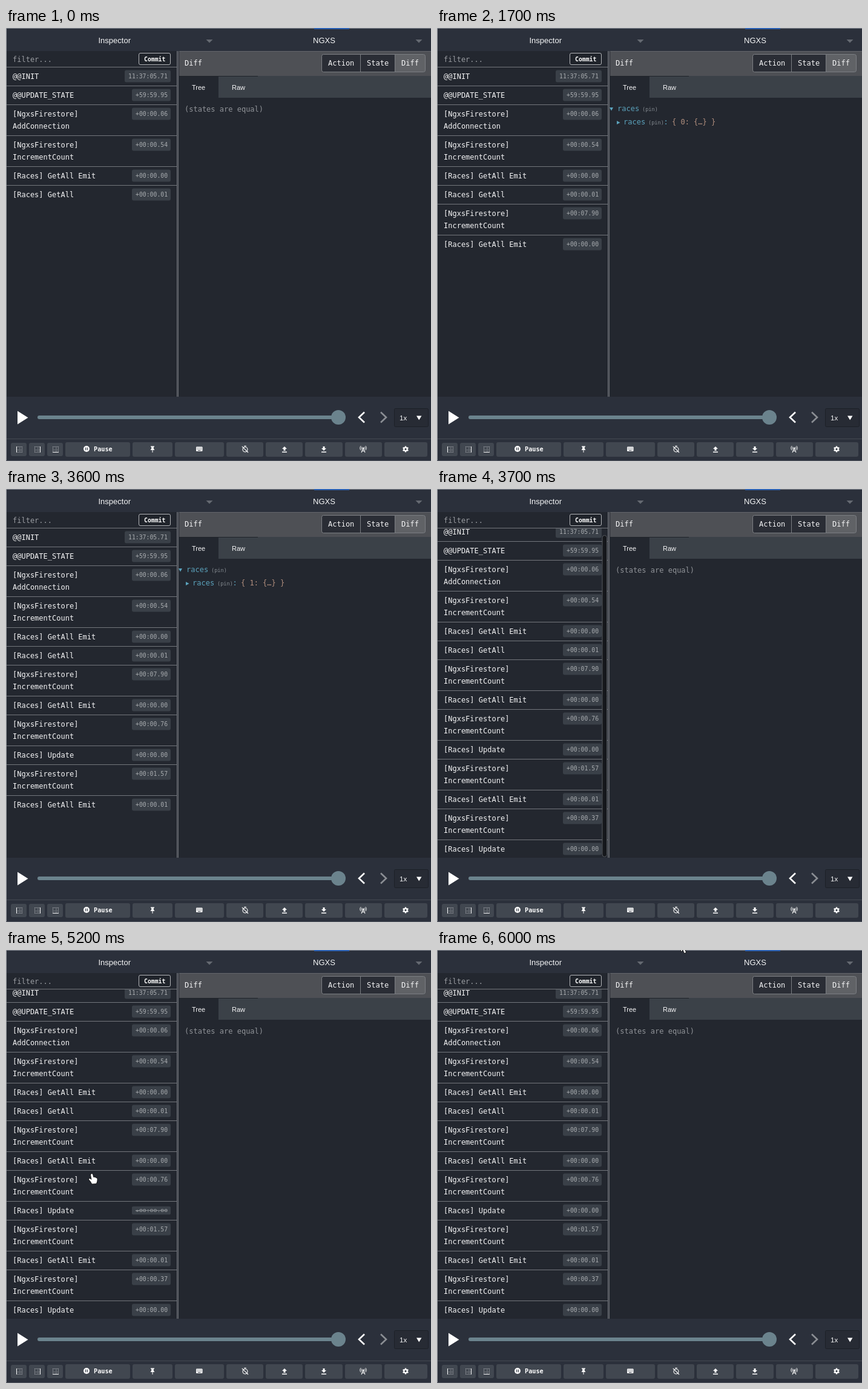
These frames come from a looping animation (702x714 px, 6100 ms). An HTML page with a canvas:

```html
<!DOCTYPE html>
<html lang="en">
<head>
<meta charset="utf-8">
<title>State inspector</title>
<style>
html, body { margin: 0; width: 100%; height: 100%; overflow: hidden; background: #2b303b; }
canvas { display: block; width: 702px; height: 714px; }
</style>
</head>
<body>
<canvas id="stage" width="702" height="714"></canvas>
<script>
const ctx = document.getElementById('stage').getContext('2d');
const LOOP = 6100, STEP = 100;
const MONO = '"DejaVu Sans Mono", monospace';
const SANS = '"Liberation Sans", Arial, sans-serif';
const PANEL = '#2b303b', DARK = '#23272f', LINE = '#73767c', BUTTON = '#414750';
const LIST_TOP = 65, LIST_BOTTOM = 608;
const COUNT = '[NgxsFirestore] IncrementCount', EMIT = '[Races] GetAll Emit', UPDATE = '[Races] Update';

// Each action: time of arrival, label, timestamp
const ACTIONS = [
  [0, '@@INIT', '11:37:05.71'],
  [0, '@@UPDATE_STATE', '+59:59.95'],
  [0, '[NgxsFirestore] AddConnection', '+00:00.06'],
  [0, COUNT, '+00:00.54'],
  [0, EMIT, '+00:00.00'],
  [0, '[Races] GetAll', '+00:00.01'],
  [1100, COUNT, '+00:07.90'],
  [1100, EMIT, '+00:00.00'],
  [1900, COUNT, '+00:00.76'],
  [1900, UPDATE, '+00:00.00'],
  [3400, COUNT, '+00:01.57'],
  [3400, EMIT, '+00:00.01'],
  [3700, COUNT, '+00:00.37'],
  [3700, UPDATE, '+00:00.00']
];
const FLIPPED_ROW = 9;

// Pointer path: time, x, y
const POINTER = [
  [4900, 150, 500], [5000, 142, 438], [5100, 140, 416], [5200, 142, 370], [5300, 168, 285],
  [5500, 268, 150], [5700, 360, 78], [5850, 414, 36], [6000, 403, -12]
];

function rect(x, y, w, h, fill) {
  ctx.fillStyle = fill;
  ctx.fillRect(x, y, w, h);
}

function box(x, y, w, h, r, fill, stroke) {
  ctx.beginPath();
  ctx.roundRect(x, y, w, h, r);
  if (fill) { ctx.fillStyle = fill; ctx.fill(); }
  if (stroke) { ctx.strokeStyle = stroke; ctx.lineWidth = 1; ctx.stroke(); }
}

function text(str, x, y, size, color, family = MONO, weight = 'normal') {
  ctx.font = `${weight} ${size}px ${family}`;
  ctx.fillStyle = color;
  ctx.fillText(str, x, y);
}

function trace(points, close) {
  ctx.beginPath();
  points.forEach(([x, y]) => ctx.lineTo(x, y));
  if (close) ctx.closePath();
}

function poly(fill, ...points) {
  trace(points, true);
  ctx.fillStyle = fill;
  ctx.fill();
}

function stroke(color, width, ...points) {
  trace(points);
  ctx.strokeStyle = color;
  ctx.lineWidth = width;
  ctx.stroke();
}

function disc(x, y, r, fill) {
  ctx.beginPath();
  ctx.arc(x, y, r, 0, 7);
  ctx.fillStyle = fill;
  ctx.fill();
}

function arc(x, y, r, from, to, width) {
  ctx.beginPath();
  ctx.arc(x, y, r, from, to);
  ctx.strokeStyle = '#fff';
  ctx.lineWidth = width;
  ctx.stroke();
}

function drawHeader() {
  rect(0, 0, 702, 714, PANEL);
  text('Inspector', 152.5, 25, 13, '#f4f5f6', SANS);
  text('NGXS', 507, 25, 13, '#f4f5f6', SANS);
  for (const x of [336, 682]) poly('#656971', [x - 5.5, 19], [x + 5.5, 19], [x, 24.5]);
}

function drawPill(label, y, squash) {
  const w = label.length > 9 ? 76 : 64;
  ctx.save();
  ctx.translate(0, y + 14.5);
  ctx.scale(1, squash);
  box(272 - w, -10, w, 20, 3, '#3a4048');
  text(label, 278 - w, 3.6, 9.8, '#a8abaf');
  ctx.restore();
  if (squash < 1) rect(214, y + 14, 52, 1, '#85898e');
}

function drawList(t) {
  rect(1, 38, 282, 570, DARK);
  const rows = ACTIONS.filter(a => a[0] <= t);
  const scroll = rows.length === ACTIONS.length ? 9 : 0;
  ctx.save();
  ctx.beginPath();
  ctx.rect(1, LIST_TOP, 281, LIST_BOTTOM - LIST_TOP);
  ctx.clip();
  let y = LIST_TOP - scroll;
  rows.forEach(([, label, stamp], i) => {
    const lines = label.startsWith('[Ngxs') ? label.split(' ') : [label];
    lines.forEach((line, n) => text(line, 11, y + 19 + n * 20, 12, '#f5f5f6'));
    const flip = i === FLIPPED_ROW ? { 5100: 0.3, 5200: 0.67 }[t] : 1;
    drawPill(stamp, y, flip || 1);
    y += lines.length > 1 ? 51 : 31;
    if (i < rows.length - 1) rect(1, y - 1, 281, 1, LINE);
  });
  ctx.restore();

  rect(1, 64, 281, 1, LINE);
  text('filter...', 11, 55.5, 12, '#9a9da2');
  box(219.5, 41.5, 52, 19, 2.5, '#20242b', '#b4b6ba');
  text('Commit', 228, 55, 9.8, '#fff', MONO, 'bold');

  if (t >= 3700 && t < 4400) {
    ctx.globalAlpha = t < 4300 ? 1 : 0.5;
    box(273, 76.5, 7.5, 530, 4, '#15171b', '#565a60');
    ctx.globalAlpha = 1;
  }
  rect(282, 38, 1, 570, LINE);
  rect(283, 38, 1, 570, '#30343c');
  rect(284, 38, 1, 570, LINE);
}

function drawTree(index) {
  const blue = '#5ba3bd', tan = '#b28f7e', dim = '#858b91';
  poly(blue, [285, 131], [291, 131], [288, 136.5]);
  text('races', 298, 137, 12, blue);
  text('(pin)', 339, 137, 8.6, dim);
  poly(blue, [297, 153], [302.5, 156], [297, 159]);
  text('races', 308, 159, 12, blue);
  text('(pin)', 349, 159, 8.6, dim);
  text(':', 374.5, 159, 12, blue);
  text(`{ ${index}: {…} }`, 388, 159, 12, tan);
}

function drawInspector(t) {
  rect(285, 38, 417, 570, DARK);
  rect(286, 38, 416, 41, '#4e5055');
  rect(286, 38, 416, 1, '#63666b');
  text('Diff', 295, 62, 12, '#f5f5f6');
  box(522, 43.5, 171, 29, 3, '#2a2d35');
  box(643, 43.5, 50, 29, [0, 3, 3, 0], '#606266');
  box(521.5, 43.5, 171, 29, 3, null, '#7b7e83');
  for (const x of [585, 642]) rect(x, 44, 1, 28, '#7b7e83');
  text('Action', 532, 62, 12, '#f5f5f6');
  text('State', 596, 62, 12, '#f5f5f6');
  text('Diff', 653, 62, 12, '#f5f5f6');

  rect(351, 79, 351, 36, '#3b4148');
  rect(286, 79, 130, 1, '#1f2329');
  text('Tree', 307, 102, 11, '#f5f5f6', SANS);
  text('Raw', 373, 102, 11, '#f5f5f6', SANS);

  if (t >= 1100 && t < 1900) drawTree(0);
  else if (t >= 3400 && t < 3700) drawTree(1);
  else text('(states are equal)', 295, 138, 12, '#909398');
}

function drawSlider() {
  rect(1, 608, 701, 69, PANEL);
  poly('#fff', [19, 631.5], [36.5, 642.5], [19, 653.5]);
  box(52, 639, 500, 6, 3, '#6b838d');
  disc(549, 642, 12, '#6b838d');
  stroke('#fff', 2.6, [592, 633.5], [583, 642], [592, 650.5]);
  stroke('#8b8e94', 2.6, [619, 633.5], [628, 642], [619, 650.5]);
  box(641.5, 627.5, 56, 30, 2, '#272b34', '#1c2027');
  text('1x', 650, 646.5, 11.5, '#f5f5f6', SANS);
  poly('#fff', [678, 639.5], [686.5, 639.5], [682.2, 646.5]);
}

function dockIcon(x, side) {
  for (let i = 0; i < 36; i++) {
    const col = i % 6, row = Math.floor(i / 6);
    const onEdge = col % 5 === 0 || row % 5 === 0 || col === 3 || row === 3;
    if (onEdge) rect(x + col * 1.8, 690 + row * 1.8, 1, 1, '#a9acb1');
  }
  if (side === 'bottom') rect(x, 699, 10, 1, '#fff');
  else rect(x + (side === 'left' ? 0 : 9), 690, 1, 10, '#fff');
}

function arrowIcon(x, dir) {
  rect(x - 4, 698.5, 8, 1.5, '#fff');
  const tip = dir > 0 ? 697 : 690, base = dir > 0 ? 693 : 694;
  poly('#fff', [x - 4, base], [x + 4, base], [x, tip]);
  rect(x - 1.5, dir > 0 ? 690 : 693, 3, 4, '#fff');
}

function drawIcons() {
  dockIcon(17, 'left');
  dockIcon(47, 'right');
  dockIcon(77, 'bottom');

  disc(133, 694, 5, '#fff');
  rect(131, 691.7, 1.3, 4.6, BUTTON);
  rect(133.8, 691.7, 1.3, 4.6, BUTTON);
  text('Pause', 145, 697.5, 10.2, '#fff', MONO, 'bold');

  rect(239, 689.5, 6, 1.3, '#fff');
  poly('#fff', [240.2, 690], [243.8, 690], [243.8, 693.5], [245.5, 696], [238.5, 696], [240.2, 693.5]);
  rect(241.5, 696, 1, 4, '#fff');

  box(314, 690.5, 10.5, 7.5, 1, '#fff');
  for (let i = 0; i < 8; i++) rect(315.3 + i % 4 * 2.2, 692 + (i > 3 ? 2 : 0), 1, 1, BUTTON);
  rect(317, 696, 4.5, 1, BUTTON);

  arc(395, 695, 4, 0, 7, 1.1);
  rect(393.3, 688.8, 3.4, 1.2, '#fff');
  stroke('#fff', 1.1, [389.8, 689.8], [400, 700]);

  arrowIcon(460, -1);
  arrowIcon(525, 1);

  disc(590, 692.7, 1.3, '#fff');
  stroke('#fff', 1.1, [587, 700], [590, 693], [593, 700]);
  stroke('#fff', 1, [588.3, 697.5], [591.7, 697.5]);
  for (const r of [3, 5.2]) {
    arc(590, 692.7, r, -0.75, 0.75, 1);
    arc(590, 692.7, r, Math.PI - 0.75, Math.PI + 0.75, 1);
  }

  for (let i = 0; i < 6; i++) {
    const a = i * Math.PI / 3 + Math.PI / 6, c = Math.cos(a), s = Math.sin(a);
    stroke('#fff', 2.4, [660 + c * 2, 694.5 + s * 2], [660 + c * 5, 694.5 + s * 5]);
  }
  arc(660, 694.5, 2.7, 0, 7, 2);
}

function drawToolbar() {
  rect(0, 677, 702, 1, '#454a53');
  for (const x of [8, 38, 68]) box(x, 684, 26, 22, 3, BUTTON);
  const spans = [[98, 205], [209, 275], [279, 360], [364, 425], [429, 490], [494, 556], [560, 621], [625, 696]];
  for (const [left, right] of spans) box(left, 683, right - left, 24, 3, BUTTON);
  drawIcons();
}

function drawFrame() {
  rect(0, 0, 702, 1, '#858a92');
  rect(0, 0, 1, 714, '#a2a5aa');
  rect(509, 0, 58, 2, '#2d62b4');
  rect(0, 713, 702, 1, '#50555e');
}

function outlined(path) {
  ctx.lineJoin = 'round';
  ctx.strokeStyle = '#111';
  ctx.lineWidth = 1.6;
  ctx.stroke(path);
  ctx.fillStyle = '#fff';
  ctx.fill(path);
  ctx.lineJoin = 'miter';
}

const HAND = new Path2D('M-2 1Q-2-1 0-1Q1 -1 1.4 1L2.4 5Q4 3.8 4.6 5.3Q6 4.4 6.6 6Q8.4 5.6 8.6 7.6L8.4 11Q8 13 7 15L0 15.5Q-1 12.5-5 8.5Q-5 6.5-3 7.3L-.5 9Z');
const ARROW = new Path2D('M0 0V14.5L3.3 11.6L5.6 17L8.2 15.9L5.9 10.7H10.5Z');

function drawPointer(t) {
  const next = POINTER.findIndex(p => p[0] >= t);
  if (t < POINTER[0][0] || next < 0) return;
  const [t1, x1, y1] = POINTER[next];
  const [t0, x0, y0] = POINTER[Math.max(0, next - 1)];
  const k = t1 > t0 ? (t - t0) / (t1 - t0) : 1;
  const x = x0 + (x1 - x0) * k, y = y0 + (y1 - y0) * k;
  ctx.save();
  ctx.translate(x, y);
  outlined(x < 282 && y > LIST_TOP ? HAND : ARROW);
  ctx.restore();
}

function render(now) {
  const t = Math.floor((now % LOOP) / STEP) * STEP;
  drawHeader();
  drawInspector(t);
  drawList(t);
  drawSlider();
  drawToolbar();
  drawFrame();
  drawPointer(t);
}

const start = performance.now();
function tick() {
  render(performance.now() - start);
  requestAnimationFrame(tick);
}
tick();
</script>
</body>
</html>
```
